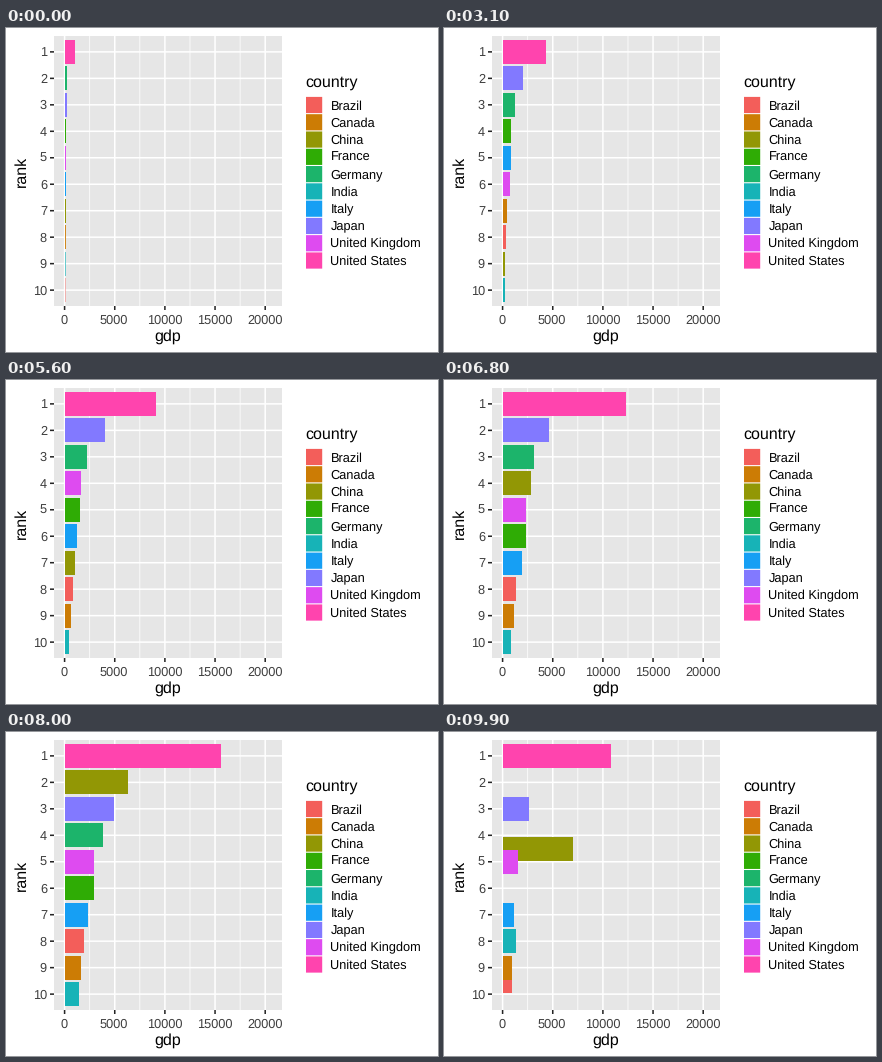
These frames come from a looping animation (432 by 324 pixels, 10 s). A matplotlib script:

```python
import numpy as np
import matplotlib.pyplot as plt
from matplotlib.animation import FuncAnimation
from matplotlib.patches import Rectangle

plt.rcParams.update({"font.family": "Liberation Sans", "text.hinting": "none"})

W, H, DPI = 432, 324, 72
LEFT, RIGHT, TOP, BOTTOM = 48, 276, 8, 278
ZERO, SCALE = 58.6, 0.01003         # gdp axis: origin and pixels per unit
PITCH = (BOTTOM - TOP) / 10.2       # distance between ranks
BAR_X, BAR_TOP, BAR_H = 59, 12, 24
KEY_TOP, KEY_PITCH = 68.9, 17.28
PANEL, AXIS_TEXT, TICK = "#e6e6e6", "#3e3e3e", "#252525"

# colour and gdp in billions at the key years
YEARS = np.arange(1970, 2019)
KEY_YEARS = [1970, 1990, 1998, 2008, 2014, 2018]
COUNTRIES = {
    "Brazil": ("#f35e5a", [42, 462, 864, 1696, 2456, 1885]),
    "Canada": ("#cc7c05", [88, 604, 634, 1549, 1804, 1725]),
    "China": ("#929705", [93, 361, 1029, 4594, 10476, 13895]),
    "France": ("#2fac05", [148, 1269, 1503, 2918, 2852, 2788]),
    "Germany": ("#1cb46b", [216, 1772, 2239, 3740, 3890, 3950]),
    "India": ("#17b3b7", [62, 321, 421, 1199, 2039, 2703]),
    "Italy": ("#169ff4", [105, 1181, 1270, 2399, 2159, 2092]),
    "Japan": ("#8279ff", [213, 3133, 4033, 5038, 4850, 4955]),
    "United Kingdom": ("#de4bf0", [135, 1093, 1651, 2931, 3064, 2861]),
    "United States": ("#ff44ae", [1073, 5963, 9063, 14713, 17527, 20580]),
}


def grow(points):
    """Accelerating growth: straight lines between square roots."""
    return np.interp(YEARS, KEY_YEARS, np.sqrt(points)) ** 2


values = np.array([grow(points) for _, points in COUNTRIES.values()])
ranks = 1 + np.argsort(np.argsort(-values, axis=0), axis=0)

fig = plt.figure(figsize=(W / DPI, H / DPI), dpi=DPI, facecolor="white")
ax = fig.add_axes([0, 0, 1, 1])
ax.set(xlim=(0, W), ylim=(H, 0))
ax.axis("off")


def box(x, y, w, h, color, z=1):
    return ax.add_patch(Rectangle((x, y), w, h, fc=color, lw=0,
                                  snap=False, zorder=z))


def line(x0, y0, x1, y1, color, width):
    ax.plot([x0, x1], [y0, y1], color=color, lw=width, zorder=2,
            solid_capstyle="butt", snap=False)


def text(x, y, s, size=12.8, color="black", ha="left", **kw):
    ax.text(x, y, s, size=size, color=color, ha=ha, va="baseline", **kw)


def px(v):
    return ZERO + SCALE * v


# panel, grid and axes
box(LEFT, TOP, RIGHT - LEFT, BOTTOM - TOP, PANEL)
for v in range(2500, 20000, 5000):
    line(px(v), TOP, px(v), BOTTOM, "white", 0.78)
for v in range(0, 20001, 5000):
    x = px(v)
    line(x, TOP, x, BOTTOM, "white", 1.55)
    line(x, BOTTOM, x, BOTTOM + 4, TICK, 1.55)
    text(x - 0.6, 295.4, str(v), color=AXIS_TEXT, ha="center")
for r in range(1, 11):
    y = TOP + PITCH * (r - 0.4)
    line(LEFT, y, RIGHT, y, "white", 1.55)
    line(LEFT - 4, y, LEFT, y, TICK, 1.55)
    text(41, y + 4.4, str(r), color=AXIS_TEXT, ha="right")
text(161.6, 312.8, "gdp", 16, ha="center")
text(19.5, 143, "rank", 16, ha="center", rotation=90, rotation_mode="anchor")

# legend and bars
text(299.4, 59, "country", 16)
bars = []
for i, (name, (color, _)) in enumerate(COUNTRIES.items()):
    y = KEY_TOP + KEY_PITCH * i
    box(300, y, 16.2, 16.2, color)
    text(324.5, y + 12.5, name)
    bars.append(box(BAR_X, BAR_TOP, 0, BAR_H, color, 3 + 0.1 * i))


def pose(frame):
    """Years hold for three ticks and one tick in turn; the last tick is
    halfway back to the first year."""
    pair, tick = divmod(frame, 4)
    k = 2 * pair + (tick == 3)
    if k < len(YEARS):
        return values[:, k], ranks[:, k]
    return ((values[:, -1] + values[:, 0]) / 2,
            (ranks[:, -1] + ranks[:, 0]) / 2)


def update(frame):
    for bar, v, r in zip(bars, *pose(frame)):
        w = max(round(px(v)) - BAR_X, min(1, SCALE * v))
        bar.set_bounds(BAR_X, round(BAR_TOP + PITCH * (r - 1)), w, BAR_H)
    return bars


anim = FuncAnimation(fig, update, frames=100, interval=100,
                     init_func=lambda: update(0), repeat=True,
                     repeat_delay=0, blit=False)
plt.show()
```
